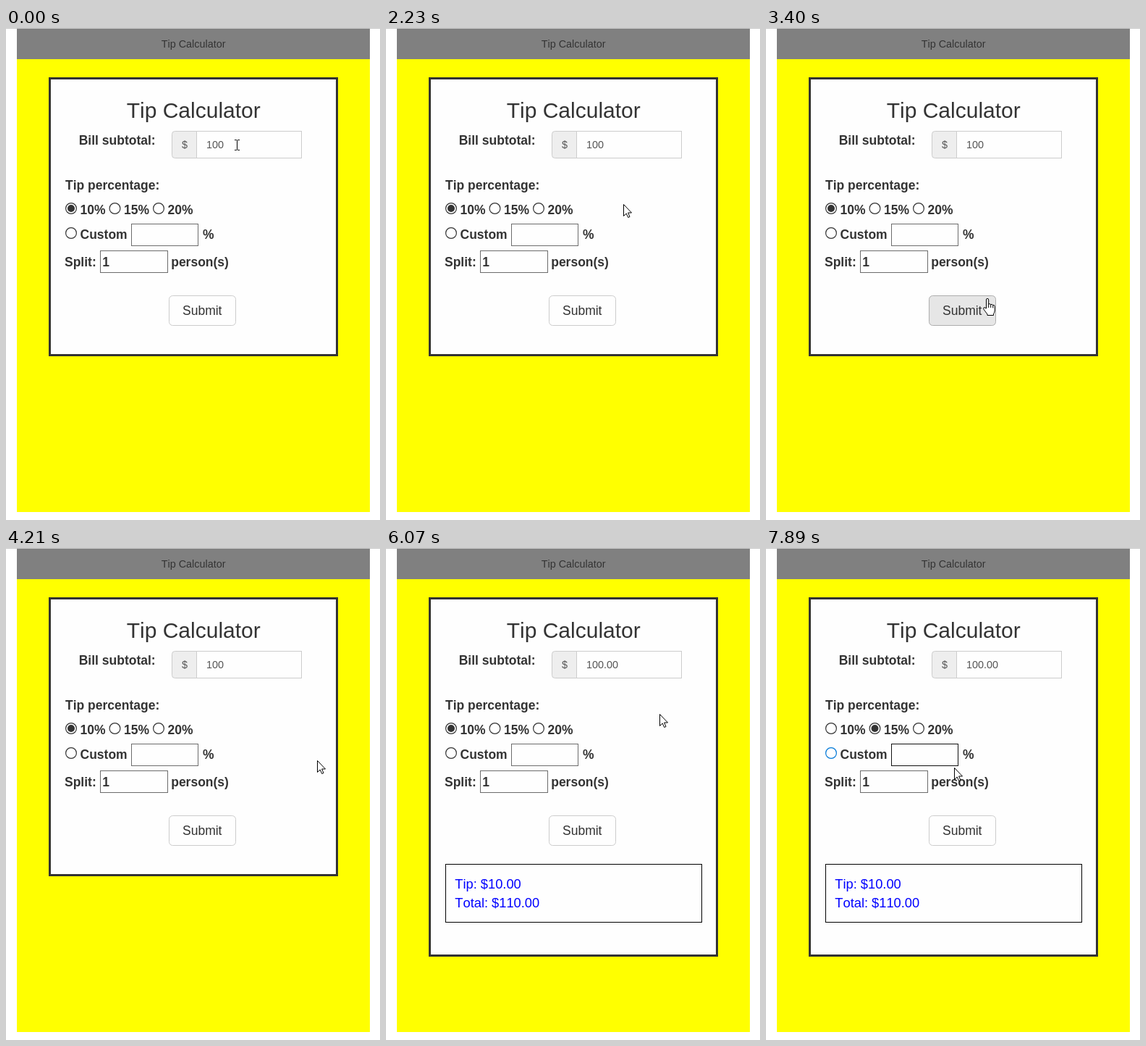
An HTML page that plays this animation: 517 by 679 pixels, repeating every 8000 ms.

```html
<!DOCTYPE html>
<html lang="en">
<head>
<meta charset="utf-8">
<title>Tip Calculator</title>
<style>
  html, body { margin: 0; width: 100%; height: 100%; overflow: hidden; background: #fff; }
  svg { display: block; width: 517px; height: 679px; }
  text { font: 14.4px "Liberation Sans", Arial, sans-serif; font-kerning: none; fill: #333; white-space: pre; }
  .bold text { font-size: 17.5px; font-weight: bold; }
  .result text { font-size: 18.3px; fill: #00f; }
  .field { fill: #fefefe; stroke: #6c6c6c; }
  .group { stroke: #ccc; }
  .value { fill: #555; }
  .ring { fill: #fefefe; stroke: #333; stroke-width: 1.2; }
  .dot { fill: #333; opacity: 0; }
  .on .dot { opacity: 1; }
  .hover .ring { stroke: #0078d7; }
  .hover .dot { fill: #0078d7; }
  .hover .field { stroke: #111; }
  #button { fill: #fefefe; stroke: #ccc; }
  #button.hover { fill: #e6e6e6; stroke: #adadad; }
  #button.pressed { fill: #e6e6e6; stroke: #8c8c8c; }
</style>
</head>
<body>
<svg viewBox="0 0 517 679">
  <path d="M0 .5H517" stroke="#c8c8c8"/>
  <rect x="15" y="1" width="488" height="42" fill="#808080"/>
  <rect x="15" y="43" width="488" height="625" fill="#ff0"/>
  <text x="214.7" y="27">Tip Calculator</text>

  <rect id="card" x="60.5" y="69.5" width="397" fill="#fefefe" stroke="#333" stroke-width="3"/>
  <text x="166.7" y="124" style="font-size:30px">Tip Calculator</text>

  <rect class="group input" x="263.5" y="142.5" width="145" height="37" fill="#fefefe"/>
  <path class="group" fill="#eee" d="M263.5 142.5H233.5a4 4 0 0 0-4 4v29a4 4 0 0 0 4 4h30z"/>
  <text class="value" x="243" y="166">$</text>
  <text class="value" id="bill" x="277" y="166"></text>

  <g class="bold">
    <text x="100.7" y="161">Bill subtotal:</text>
    <text x="82" y="223">Tip percentage:</text>
    <g id="labels"></g>
    <text x="272" y="291">%</text>
    <text x="81" y="329">Split:</text>
    <rect class="field input" x="130.5" y="307.5" width="93" height="30"/>
    <text x="133.3" y="329">1</text>
    <text x="228.2" y="329">person(s)</text>
  </g>

  <rect id="button" x="225.5" y="369.5" width="92" height="41" rx="5"/>
  <text x="244" y="396" style="font-size:17.5px">Submit</text>

  <g id="result" class="result">
    <rect x="82.5" y="436.5" width="354" height="80" fill="none" stroke="#000"/>
    <text x="95.3" y="470">Tip: $10.00</text>
    <text x="95.3" y="496">Total: $110.00</text>
  </g>

  <g id="pointer" fill="#fff" stroke="#000" stroke-linejoin="round">
    <path id="arrow" d="M.5.5V16.5L4.2 13 6.7 18.5 9 17.5 6.6 12H11.5z"/>
    <path id="hand" d="M-1.5 14V2a1.6 1.6 0 0 1 3.2 0V8q1.5-1 3 .6 1.5-.8 3 .8 2.3-.6 2.5 1.8V17q-.3 3-1.7 4.5V23.5H0V22q-3.5-4.5-5.5-7.5 0-2.5 2.5-1.5zM1.7 8v5M4.7 8.6v4.4M7.7 9.4v4"/>
    <path id="beam" fill="none" d="M-3-6.5H0M1-6.5H4M.5-6V7M-3 7.5H0M1 7.5H4"/>
  </g>
</svg>
<script>
const LOOP = 8000, STEP = 130;
const CLICK = 3930, RELEASE = 4210, SHOW = 4350, PICK = 7630;
const $ = id => document.getElementById(id);

// Each stroke goes to a point; "via" bends it.
const strokes = [
  { from: 530, until: 660, to: [359, 315] },
  { from: 1320, until: 2230, to: [328, 243], via: [318, 126] },
  { from: 2360, until: 3010, to: [324, 249], via: [150, 262] },
  { from: 3140, until: 3400, to: [306, 373] },
  { from: CLICK, until: CLICK + STEP, to: [430, 293] },
  { from: 5280, until: 5670, to: [378, 229] },
  { from: 6200, until: 6850, to: [212, 248], via: [290, 270] },
  { from: 6980, until: 7370, to: [150, 250] },
  { from: PICK + STEP, until: PICK + 2 * STEP, to: [260, 303] }
];

function pointerAt(t) {
  let pos = [319, 161];
  for (const { from, until, to, via } of strokes) {
    if (t < from) break;
    const k = Math.min(1, (Math.floor((t - from) / STEP) + 1) / (Math.round((until - from) / STEP) + 1));
    pos = pos.map((a, i) => {
      const bend = via ? via[i] : (a + to[i]) / 2;
      return Math.round((1 - k) ** 2 * a + 2 * k * (1 - k) * bend + k * k * to[i]);
    });
  }
  return pos;
}

const label = (x, y, text, extra = "") => `<g class="label">
  <circle class="ring" cx="${x}" cy="${y}" r="7.4"/><circle class="dot" cx="${x}" cy="${y}" r="5"/>
  <text x="${x + 12.5}" y="${y + 8}">${text}</text>${extra}</g>`;
$("labels").innerHTML =
  ["10%", "15%", "20%"].map((text, i) => label(90 + 60.5 * i, 249, text)).join("") +
  label(90, 283, "Custom", '<rect class="field input" x="173.5" y="270.5" width="92" height="30"/>');

const labels = [...document.querySelectorAll(".label")];
const inputs = [...document.querySelectorAll(".input")];

function over(node, [x, y], pad = 0) {
  const b = node.getBBox();
  return x >= b.x - pad && x <= b.x + b.width + pad && y >= b.y - pad && y <= b.y + b.height + pad;
}

const show = (id, on) => $(id).style.display = on ? "inline" : "none";

function draw(t) {
  const pos = pointerAt(t);
  const done = t >= SHOW;
  const onButton = over($("button"), pos);
  const shape = onButton ? "hand" : inputs.some(n => over(n, pos)) ? "beam" : "arrow";

  $("pointer").setAttribute("transform", `translate(${pos})`);
  for (const id of ["arrow", "hand", "beam"]) show(id, id === shape);

  $("button").classList.toggle("hover", onButton);
  $("button").classList.toggle("pressed", t >= CLICK && t < RELEASE);

  const picked = t >= PICK ? 1 : 0;
  labels.forEach((node, i) => {
    node.classList.toggle("on", i === picked);
    node.classList.toggle("hover", over(node, pos, 3));
  });

  $("bill").textContent = done ? "100.00" : "100";
  $("card").setAttribute("height", done ? 493 : 382);
  show("result", done);
}

function tick() {
  draw(performance.now() % LOOP);
  requestAnimationFrame(tick);
}
tick();
</script>
</body>
</html>
```
